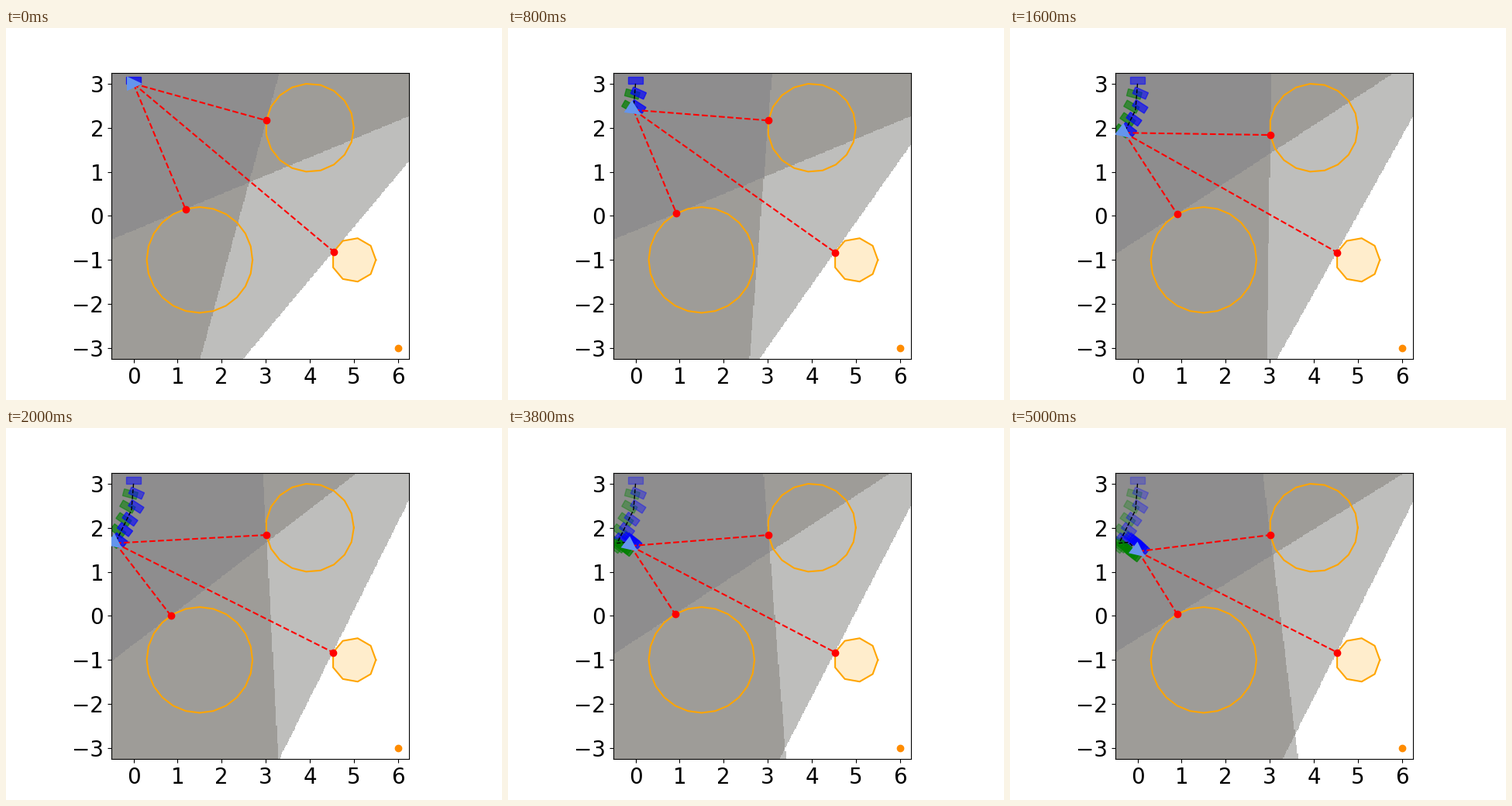
Recreate the animation shown at these times as a matplotlib script. Size 640 px wide and 480 px high, loop 5200 ms.

```python
import numpy as np
import matplotlib.pyplot as plt
from matplotlib.animation import FuncAnimation
from matplotlib.colors import ListedColormap
from matplotlib.patches import Polygon

STEPS = 26
XLIM, YLIM = (-0.5, 6.25), (-3.25, 3.25)
GRID = 300


def ring(x, y, r, n):
    a = np.linspace(0, 2 * np.pi, n)
    return np.column_stack((x + r * np.cos(a), y + r * np.sin(a)))


def place(shape, pos, angle):
    """Turn a local outline by angle and move it to pos."""
    c, s = np.cos(angle), np.sin(angle)
    return np.asarray(shape) @ np.array([[c, s], [-s, c]]) + pos


def nearest(poly, p):
    """Closest boundary point to p; vertical edges only count by their ends."""
    best, dist = poly[0], np.inf
    for a, b in zip(poly[:-1], poly[1:]):
        d = b - a
        if abs(d[0]) < 1e-6:
            continue
        q = a + np.clip((p - a) @ d / (d @ d), 0, 1) * d
        gap = np.hypot(*(p - q))
        if gap < dist:
            best, dist = q, gap
    return best


obstacles = [ring(4, 2, 1, 20), ring(1.5, -1, 1.2, 25), ring(5, -1, 0.5, 10)]

# Body path through a few key steps: descend, turn, then creep right
step = np.arange(STEPS)
keys = [0, 4, 6, 10, 15, 25]
body = np.column_stack((
    np.interp(step, keys, [0, -0.045, -0.185, -0.415, -0.2, 0.017]),
    np.interp(step, keys, [3, 2.405, 2.12, 1.65, 1.67, 1.462])))
heading = np.radians(-38) * (1 - np.exp(-step / 2))

# Left and right footholds alternate around the body
side = np.where(step % 2 == 0, 1, -1)
settle = 1 - np.exp(-step)
sway = np.radians(-55) * settle
reach = side * (0.07 + 0.06 * settle)
feet = body + reach[:, None] * np.column_stack((-np.sin(sway), np.cos(sway)))

FOOT = [(-0.16, -0.08), (0.16, -0.08), (0.16, 0.08), (-0.16, 0.08)]
BODY = [(-0.15, -0.165), (0.2, 0), (-0.15, 0.165)]

fig, ax = plt.subplots(figsize=(6.4, 4.8), dpi=100)
shades = ListedColormap(["#ffffff", "#bebebc", "#9e9c98", "#8e8d8e"])
gx, gy = np.meshgrid(np.linspace(*XLIM, GRID), np.linspace(*YLIM, GRID))
zone = ax.imshow(np.zeros((GRID, GRID)), cmap=shades, vmin=-0.5, vmax=3.5,
                 extent=XLIM + YLIM, origin="lower", interpolation="nearest")

for poly in obstacles:
    ax.plot(*poly.T, color="orange", lw=1.5)
ax.fill(*obstacles[2].T, color="orange", alpha=0.2, lw=0)
ax.plot(6, -3, "o", color="darkorange", ms=6)

prints = []
for k in step:
    color = "blue" if side[k] > 0 else "green"
    patch = Polygon(place(FOOT, feet[k], heading[k]), color=color, lw=1)
    prints.append(ax.add_patch(patch))
trail, = ax.plot([], [], "--", color="black", lw=1)
rays = [ax.plot([], [], "--", color="red", lw=1.5)[0] for _ in obstacles]
dots = [ax.plot([], [], "o", color="red", ms=6)[0] for _ in obstacles]
robot = ax.add_patch(Polygon(BODY, color="cornflowerblue", lw=0, zorder=4))

ax.set(xlim=XLIM, ylim=YLIM, xticks=range(7), yticks=range(-3, 4))
ax.tick_params(labelsize=20)


def update(n):
    p = body[n]
    count = np.zeros((GRID, GRID))
    for poly, ray, dot in zip(obstacles, rays, dots):
        q = nearest(poly, p)
        normal = p - q
        count += (gx - q[0]) * normal[0] + (gy - q[1]) * normal[1] >= 0
        ray.set_data([p[0], q[0]], [p[1], q[1]])
        dot.set_data([q[0]], [q[1]])
    zone.set_data(count)
    for k, patch in enumerate(prints):
        patch.set_visible(k <= n)
        patch.set_alpha(0.75 * np.exp(-0.045 * max(n - k, 0)))
    trail.set_data(*body[:n + 1].T)
    robot.set_xy(place(BODY, p, heading[n]))
    return [zone, trail, robot, *prints, *rays, *dots]


anim = FuncAnimation(fig, update, frames=STEPS, interval=200,
                     init_func=lambda: update(0), repeat=True, repeat_delay=0)
plt.show()
```
